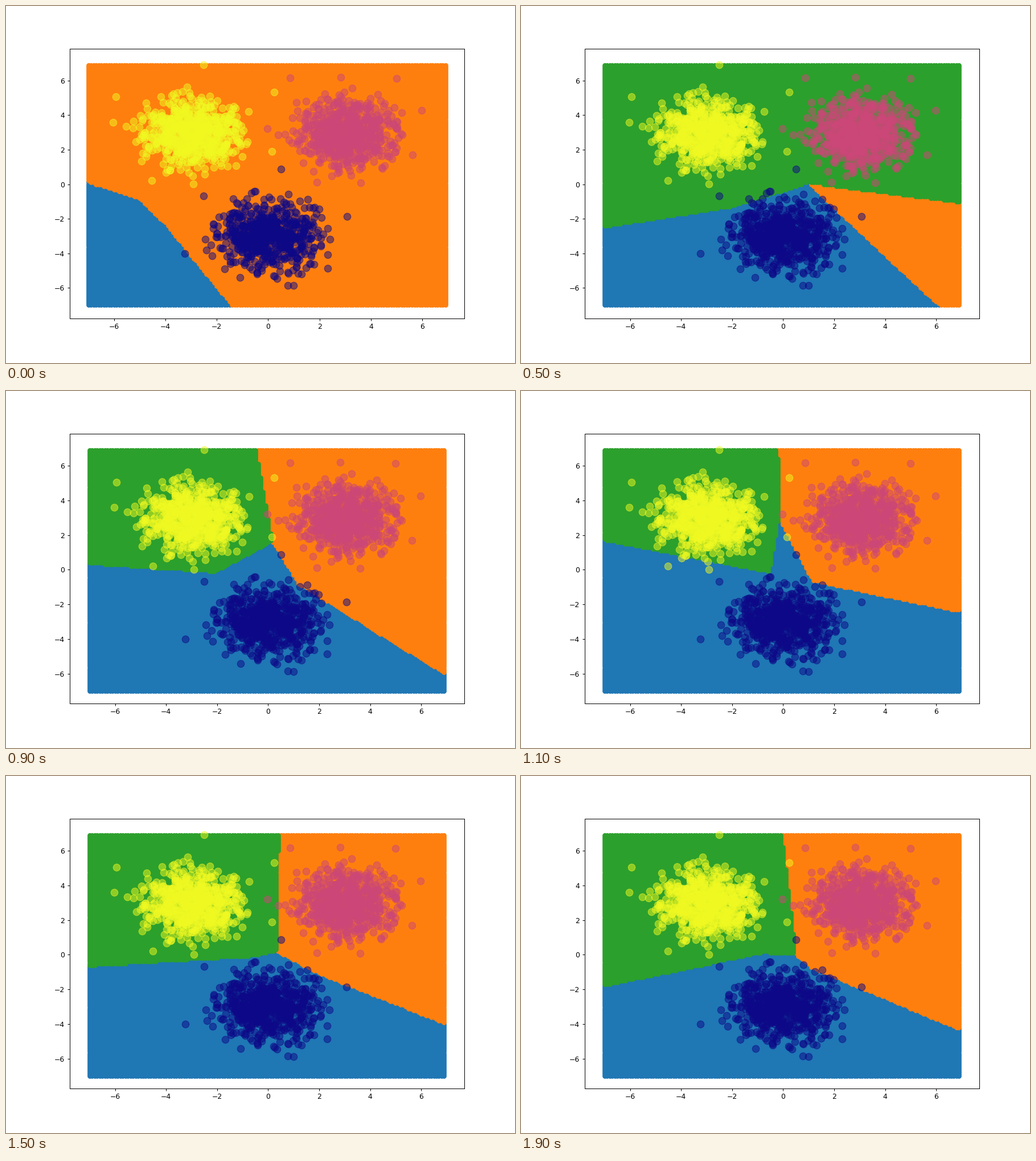
A matplotlib script that plays this animation: 894 by 626 pixels, repeating every 2000 ms.

```python
import numpy as np
import matplotlib.pyplot as plt
from matplotlib.animation import FuncAnimation
from matplotlib.path import Path

W, H, DPI = 894, 626, 100
FRAMES, STEP = 20, 100
LEFT, RIGHT, BOTTOM, TOP = 0.125, 0.9, 0.125, 0.88
AX_PX = np.array([(RIGHT - LEFT) * W, (TOP - BOTTOM) * H])

# A 10-inch-wide default figure, shrunk: every point size scales by K.
K = W / (10 * DPI)
GRID_S, DATA_S = 36 * K**2, 100 * K**2
plt.rcParams.update({"font.size": 10 * K, "axes.linewidth": .8 * K})

# Cluster centre, colour map position and its most distant samples.
CLUSTERS = [
    ((0, -3), 0.0, [(.5, .87), (3.07, -1.86), (.99, -5.88), (.77, -5.85),
                    (-3.25, -4), (-2.52, -.68), (2.31, -4.86)]),
    ((3, 3), 0.5, [(.86, 6.16), (2.83, 6.21), (5, 6.13), (5.98, 4.27),
                   (3.61, .08), (1.9, .1), (5.63, 1.7), (-.03, 3.21)]),
    ((-3, 3), 1.0, [(-2.52, 6.93), (.23, 5.32), (.15, 1.89), (-5.94, 5.06),
                    (-6.03, 3.6), (-2.92, .02), (-4.53, .2)]),
]

# Three borders leave a hub: the left and right ones bend once at a knee.
# Step: hub x, y, left knee x, y, left angle, top angle,
#       right knee x, y, right angle (degrees)
KEYS = {
    0: (-5, -.85, -6, -.33, 155, 155, -4, -2.3, 298.8),
    3: (0, -.07, -3, -.65, 191, 191, 3, .51, 371),
    5: (1, .1, -2, -1.28, 193.2, -10.8, 1.5, -.64, 305.9),
    7: (.5, .28, -3.6, -.12, 185, 103.8, 1.25, -1, 292.9),
    11: (-.17, 3.05, -.55, -.13, 164, 90.5, 1.15, -.62, 342.8),
    15: (.3, .2, -.7, -.1, 184.7, 89, 2.2, -1.2, 329.9),
    19: (.5, 0, -.8, .13, 197, 94.6, 1.1, -.72, 328.5),
}
PARAMS = np.array(list(KEYS.values())).T

axis = np.arange(-70, 70) / 10
grid = np.stack(np.meshgrid(axis, axis), -1).reshape(-1, 2)


def far(p, angle):
    a = np.radians(angle)
    return p[0] + 40 * np.cos(a), p[1] + 40 * np.sin(a)


def inside(verts):
    return Path(verts).contains_points(grid)


def classify(i):
    """Class of every grid point: 0 blue, 1 orange, 2 green."""
    label = np.ones(len(grid), int)
    if i in (1, 2):  # the net briefly collapses to one class
        return label
    hx, hy, lx, ly, left, top, rx, ry, right = (
        np.interp(i, list(KEYS), p) for p in PARAMS)
    hub, lknee, rknee = (hx, hy), (lx, ly), (rx, ry)
    edge = [hub, lknee, far(lknee, left)]
    if i > 3:
        label[inside(edge + [far(hub, (left + top) / 2), far(hub, top)])] = 2
    label[inside(edge + [far(hub, (left + right) / 2),
                         far(rknee, right), rknee])] = 0
    return label


def limits(layers):
    """Grow the view layer by layer, padding each by its marker radius."""
    lo, hi = np.full(2, np.inf), np.full(2, -np.inf)
    span = np.ones(2)
    for pts, size in layers:
        if len(pts):
            pad = np.sqrt(size) / 2 * DPI / 72 / AX_PX * span
            lo = np.minimum(lo, pts.min(0) - pad)
            hi = np.maximum(hi, pts.max(0) + pad)
            span = (hi - lo) * 1.1
    margin = (hi - lo) * .05
    return np.stack([lo - margin, hi + margin], 1)


def sample(rng, center, strays, n=660):
    core = rng.normal(size=(n, 2))
    core = core[np.hypot(*core.T) < 2.65] + center
    return np.vstack([core, strays])


fig = plt.figure(figsize=(W / DPI, H / DPI), dpi=DPI, facecolor="white")
ax = fig.add_axes([LEFT, BOTTOM, RIGHT - LEFT, TOP - BOTTOM])
ax.set_xticks(range(-6, 7, 2))
ax.set_yticks(range(-6, 7, 2))
ax.tick_params(length=3.5 * K, width=.8 * K, pad=3.5 * K)

areas = [ax.scatter([], [], s=GRID_S, c=f"C{k}", linewidths=K, zorder=1 + k / 10)
         for k in range(3)]
rng = np.random.default_rng(4)
data = []
for center, shade, strays in CLUSTERS:
    pts = sample(rng, center, strays)
    ax.scatter(*pts.T, s=DATA_S, color=plt.cm.plasma(shade), alpha=.5,
               linewidths=K, zorder=2)
    data.append(pts)
data = np.vstack(data)


def draw(i):
    label = classify(i)
    parts = [grid[label == k] for k in range(3)]
    for area, pts in zip(areas, parts):
        area.set_offsets(pts)
    xlim, ylim = limits([(p, GRID_S) for p in parts] + [(data, DATA_S)])
    ax.set_xlim(*xlim)
    ax.set_ylim(*ylim)
    return areas


anim = FuncAnimation(fig, draw, frames=FRAMES, interval=STEP,
                     init_func=lambda: draw(0), repeat=True, repeat_delay=0)
plt.show()
```
